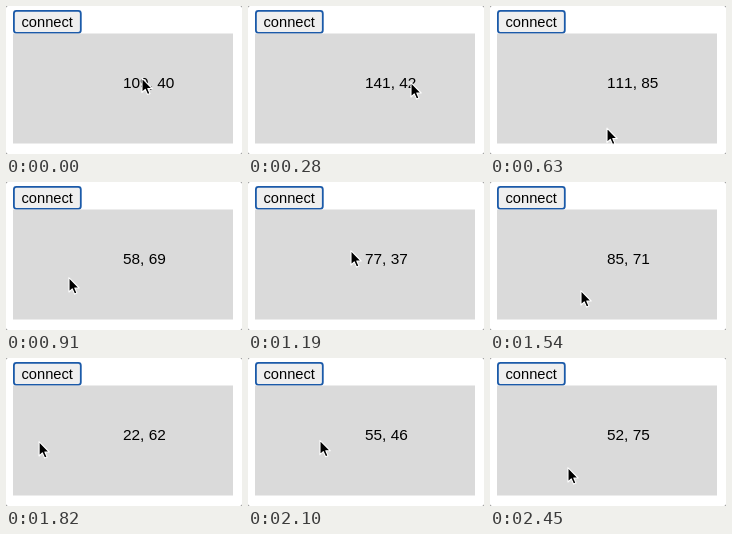
These frames come from a looping animation (236x148 px, 2520 ms). An HTML page:

```html
<!DOCTYPE html>
<html lang="en">
<head>
<meta charset="utf-8">
<title>Pointer position</title>
<style>
  html, body { margin: 0; width: 100%; height: 100%; overflow: hidden; background: #777; }
  svg { display: block; width: 236px; height: 148px; }
  text { font-family: "Liberation Sans", Arial, sans-serif; font-kerning: none; white-space: pre; }
</style>
</head>
<body>
<svg viewBox="0 0 236 148">
  <rect width="236" height="148" rx="2" fill="#fff"/>
  <rect x="7.9" y="4.9" width="66.9" height="21.9" rx="2.5" fill="#efefef" stroke="#1b5aa9" stroke-width="1.8"/>
  <text x="15.5" y="21" font-size="14.67">connect</text>
  <rect x="7" y="27.5" width="220" height="110" fill="#dadada"/>
  <text id="label" x="117" y="82" font-size="15.4"></text>
  <path id="pointer" d="M0 0V14.4L3.3 11.3L5.6 16.5L8 15.5L5.8 10.4H10.2Z" stroke="#fff" stroke-width="1.1" stroke-linejoin="round"/>
</svg>
<script>
const STEP = 70, STEPS = 36, SCALE = 1.1, LEFT = 7, TOP = 28;
const label = document.getElementById("label");
const pointer = document.getElementById("pointer");

// Key points of the looping hand movement: [step, x, y]
const keys = [
  [-1, 127, 72], [3, 162, 74.3], [4, 163, 77], [8, 129, 121.6], [9, 117, 122.5],
  [13, 63, 96], [16, 91.8, 68.8], [17, 103, 69], [19, 116, 81], [21, 100.5, 106],
  [22, 91, 109], [24, 36, 106], [27, 39, 75], [29, 67.5, 78.6], [30, 72, 82.7],
  [34, 64.2, 110.5], [35, 78, 110]
];

const slope = (i, k) => {
  const a = keys[Math.max(i - 1, 0)], b = keys[Math.min(i + 1, keys.length - 1)];
  return (b[k] - a[k]) / (b[0] - a[0]);
};

// Cubic Hermite curve through the key points
function at(step) {
  let i = 0;
  while (i < keys.length - 2 && keys[i + 1][0] <= step) i++;
  const a = keys[i], b = keys[i + 1], d = b[0] - a[0], u = (step - a[0]) / d;
  const w = u * u * (3 - 2 * u);
  return [1, 2].map(k =>
    a[k] + (b[k] - a[k]) * w +
    d * u * (1 - u) * ((1 - u) * slope(i, k) - u * slope(i + 1, k)));
}

function draw(time) {
  const step = Math.floor(time / STEP) % STEPS;
  const [x, y] = at(step);
  const [px, py] = at(step - 1); // the readout lags one step behind
  pointer.setAttribute("transform", `translate(${x.toFixed(1)} ${(y - 0.4).toFixed(1)})`);
  label.textContent = `${Math.round((px - LEFT) / SCALE)}, ${Math.round((py - TOP) / SCALE)}`;
}

const start = performance.now();
function tick() {
  draw(performance.now() - start);
  requestAnimationFrame(tick);
}
tick();
</script>
</body>
</html>
```
